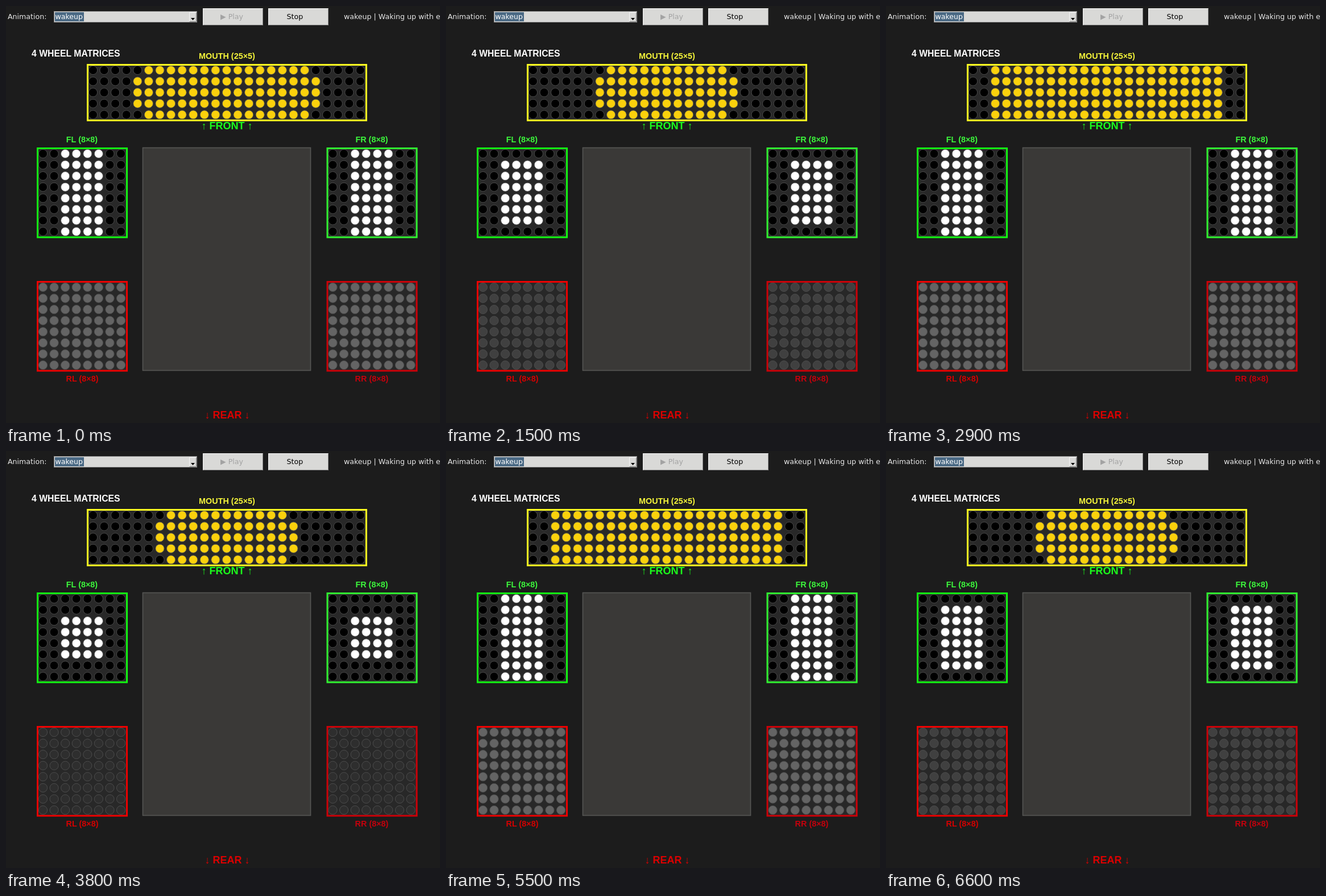
An HTML page for the animation above (6900 ms loop, 763x734 px).

```html
<!DOCTYPE html>
<html lang="en">
<head>
<meta charset="utf-8">
<title>Wheel matrices</title>
<style>
html, body { margin: 0; width: 100%; height: 100%; overflow: hidden; background: #1c1c1c; }
svg { display: block; width: 763px; height: 734px; }
text { white-space: pre; }
.ui { font: 12.6px "DejaVu Sans", sans-serif; }
.label { font: bold 14.4px "Liberation Sans", Arial, sans-serif; text-anchor: middle; }
.big { font-size: 18px; }
</style>
</head>
<body>
<svg id="stage" viewBox="0 0 763 734"></svg>
<script>
const LOOP = 6900, TICK = 100, LAST_TICK = 6600;
const CYCLE = 2409, CYCLE_START = 684;
const PITCH = 19.58;
const BLACK = '#000', WHITE = '#fff', YELLOW = '#fbd10c';
const REAR_GREYS = ['#1d1d1d', '#2e2e2e', '#404040', '#646464'];
const stage = document.getElementById('stage');

function add(tag, attrs, content) {
  const node = document.createElementNS('http://www.w3.org/2000/svg', tag);
  for (const key in attrs) node.setAttribute(key, attrs[key]);
  if (content) node.textContent = content;
  return stage.appendChild(node);
}

const rect = (x, y, width, height, fill, more) => add('rect', { x, y, width, height, fill, ...more });
const line = (d, stroke, width = 1) => add('path', { d, stroke, 'stroke-width': width, fill: 'none' });
const uiText = (x, y, fill, content) => add('text', { x, y, fill, class: 'ui' }, content);
const label = (x, y, fill, content, size = '') => add('text', { x, y, fill, class: 'label ' + size }, content);

function bevel(x, y, w, h) {
  rect(x, y, w, h, '#d9d9d7');
  line(`M${x + .5} ${y + h - .5}V${y + .5}H${x + w - .5}`, '#f4f4f4');
  line(`M${x + .5} ${y + h - .5}H${x + w - .5}V${y + .5}`, '#858585');
}

function matrix(x, y, cols, rows, colour) {
  const w = (cols - 1) * PITCH, h = (rows - 1) * PITCH;
  rect(x - 9.5, y - 9.5, w + 20, h + 19.5, '#282828', { stroke: colour, 'stroke-width': 3 });
  const dots = [];
  for (let row = 0; row < rows; row++) {
    for (let col = 0; col < cols; col++) {
      const node = add('circle', {
        cx: x + col * PITCH, cy: y + row * PITCH, r: 7.6, stroke: '#505050', 'stroke-width': .9
      });
      dots.push({ node, row, col });
    }
  }
  return dots;
}

function paint(dots, colourAt) {
  for (const { node, row, col } of dots) node.setAttribute('fill', colourAt(row, col));
}

function drawToolbar() {
  uiText(3, 23, '#e8e8e8', 'Animation:');
  bevel(84, 9, 252, 20);
  line('M84.5 29V9.5H336', '#858585');
  rect(86, 11, 51, 16, '#4a6984');
  uiText(86.5, 23, WHITE, 'wakeup');
  bevel(322, 11, 13, 17);
  add('path', { d: 'M325 21H332L328.5 25Z', fill: BLACK });
  bevel(346, 4, 106, 30);
  uiText(377, 23, '#a3a3a3', '▶ Play');
  bevel(461, 4, 106, 30);
  uiText(493.5, 23, BLACK, 'Stop');
  uiText(594, 23, '#e8e8e8', 'wakeup | Waking up with eyes');
}

rect(0, 0, 763, 734, '#1c1c1c');
drawToolbar();
add('text', { x: 45, y: 89, fill: WHITE, class: 'label', style: 'font-size:15.8px;text-anchor:start' }, '4 WHEEL MATRICES');
label(388.5, 93, '#f5f53a', 'MOUTH (25×5)');
label(388.5, 217, '#1cff1c', '↑ FRONT ↑', 'big');
label(389, 726, '#dc0000', '↓ REAR ↓', 'big');
label(133.5, 240, '#3cf63c', 'FL (8×8)');
label(643, 240, '#3cf63c', 'FR (8×8)');
label(134, 661, '#d40000', 'RL (8×8)');
label(643, 661, '#c4000c', 'RR (8×8)');
rect(240.5, 249.5, 295, 392, '#3a3937', { stroke: '#565654', 'stroke-width': 1.6 });

const mouth = matrix(153, 113, 25, 5, '#ffff20');
const eyes = [matrix(65, 260, 8, 8, '#12f712'), matrix(574.5, 260, 8, 8, '#30f230')];
const rears = [matrix(65, 495, 8, 8, '#ee0000'), matrix(574.5, 495, 8, 8, '#cc0008')];

// The mouth widens in four equal stages; the eyes open early in the cycle and stay open.
function render(time) {
  const tick = Math.min(Math.floor(time / TICK) * TICK, LAST_TICK);
  const phase = (tick - CYCLE_START + CYCLE) % CYCLE;
  const mouthStage = Math.floor(phase / (CYCLE / 4));
  const eyeStage = [310, 800, 1205].filter(limit => phase >= limit).length;
  const halfWidth = 4 + 2 * mouthStage;
  const edgeWidth = [-1, halfWidth - 1, halfWidth - 1, halfWidth][mouthStage];

  paint(mouth, (row, col) => {
    const reach = row % 4 === 0 ? edgeWidth : halfWidth;
    return Math.abs(col - 12) <= reach ? YELLOW : BLACK;
  });
  for (const eye of eyes) paint(eye, (row, col) =>
    Math.abs(col - 3.5) < 2 && Math.abs(row - 3.5) < eyeStage + 1 ? WHITE : BLACK);
  for (const rear of rears) paint(rear, () => REAR_GREYS[eyeStage]);
}

const start = performance.now();
function frame() {
  render((performance.now() - start) % LOOP);
  requestAnimationFrame(frame);
}
frame();
</script>
</body>
</html>
```
